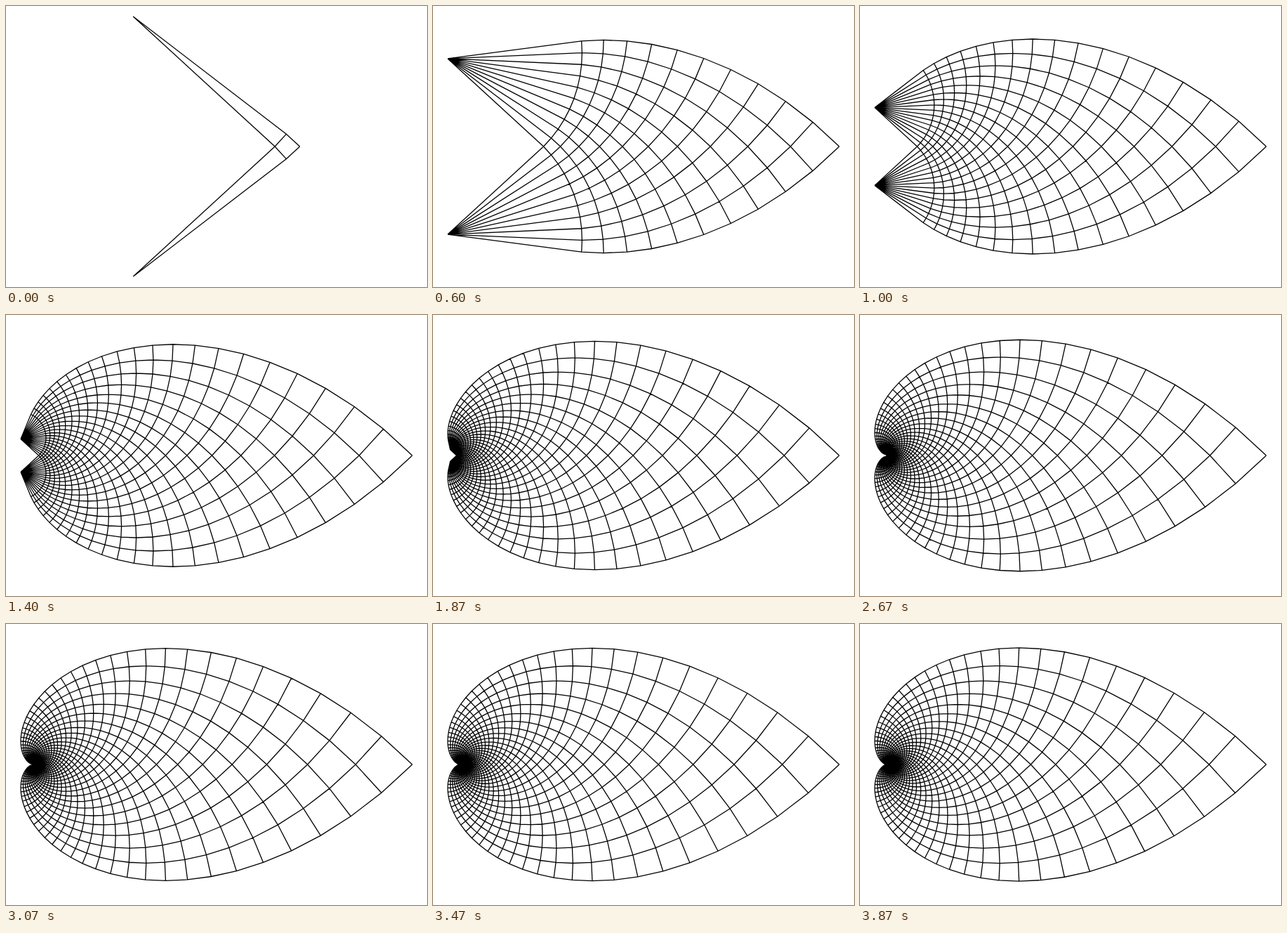
Write an HTML page that moves like this. It is 600 px wide and 400 px high and loops after 3940 ms.

```html
<!DOCTYPE html>
<html lang="en">
<head>
<meta charset="utf-8">
<title>Growing orthogonal net</title>
<style>
  html, body { margin: 0; width: 100%; height: 100%; overflow: hidden; background: #fff; }
  svg { display: block; width: 600px; height: 400px; }
  path { fill: none; stroke: #000; stroke-width: 1.3; }
</style>
</head>
<body>
<svg viewBox="0 0 600 400"><path id="net"/></svg>
<script>
const LOOP = 3940, FRAMES = 59, SIZE = FRAMES + 1;
const FIT_W = 558, FIT_H = 370;
const RAD = Math.PI / 180, STEP = 5, FIRST = 42.5;

const cross = (a, b) => a[0] * b[1] - a[1] * b[0];
const ray = (deg, side) => [Math.cos(deg * RAD), side * Math.sin(deg * RAD)];

// Where the ray from p along u meets the ray from q along v.
function meet(p, u, q, v) {
  const s = cross([q[0] - p[0], q[1] - p[1]], v) / cross(u, v);
  return [p[0] + s * u[0], p[1] + s * u[1]];
}

const top0 = ray(FIRST, -1), bottom0 = ray(FIRST, 1);
const upper = [-top0[0], top0[1]], lower = [-bottom0[0], bottom0[1]];

// Each chord turns by STEP from the one before it, in both families.
const nodes = [];
for (let i = 0; i < SIZE; i++) {
  nodes.push([]);
  for (let j = 0; j < SIZE; j++) {
    const turn = STEP * (j - i);
    const p = j ? nodes[i][j - 1] : upper;
    const q = i ? nodes[i - 1][j] : lower;
    nodes[i].push(meet(p, ray(FIRST + turn, 1), q, ray(FIRST - turn, -1)));
  }
}

function netPath(n) {
  const lines = [];
  for (let i = 0; i < n; i++) {
    const down = [upper], up = [lower];
    for (let j = 0; j < n; j++) {
      down.push(nodes[i][j]);
      up.push(nodes[j][i]);
    }
    lines.push(down, up);
  }

  let x0 = Infinity, x1 = -Infinity, y1 = 0;
  for (const [x, y] of lines.flat()) {
    x0 = Math.min(x0, x);
    x1 = Math.max(x1, x);
    y1 = Math.max(y1, Math.abs(y));
  }
  const scale = Math.min(FIT_W / (x1 - x0), FIT_H / (2 * y1));
  const mid = (x0 + x1) / 2;
  const place = ([x, y]) =>
    (300 + (x - mid) * scale).toFixed(2) + " " + (200 + y * scale).toFixed(2);
  return lines.map(line => "M" + line.map(place).join("L")).join("");
}

// Fifteen steps a second, on a 10 ms clock.
const startOf = k => Math.round(k * 20 / 3) * 10;
function frameAt(t) {
  let k = Math.min(FRAMES - 1, Math.floor(t * 15 / 1000) + 1);
  while (startOf(k) > t) k--;
  return k;
}

const net = document.getElementById("net");
const start = performance.now();
let shown = -1;

function draw() {
  const k = frameAt((performance.now() - start) % LOOP);
  if (k !== shown) {
    net.setAttribute("d", netPath(k + 2));
    shown = k;
  }
  requestAnimationFrame(draw);
}
draw();
</script>
</body>
</html>
```
